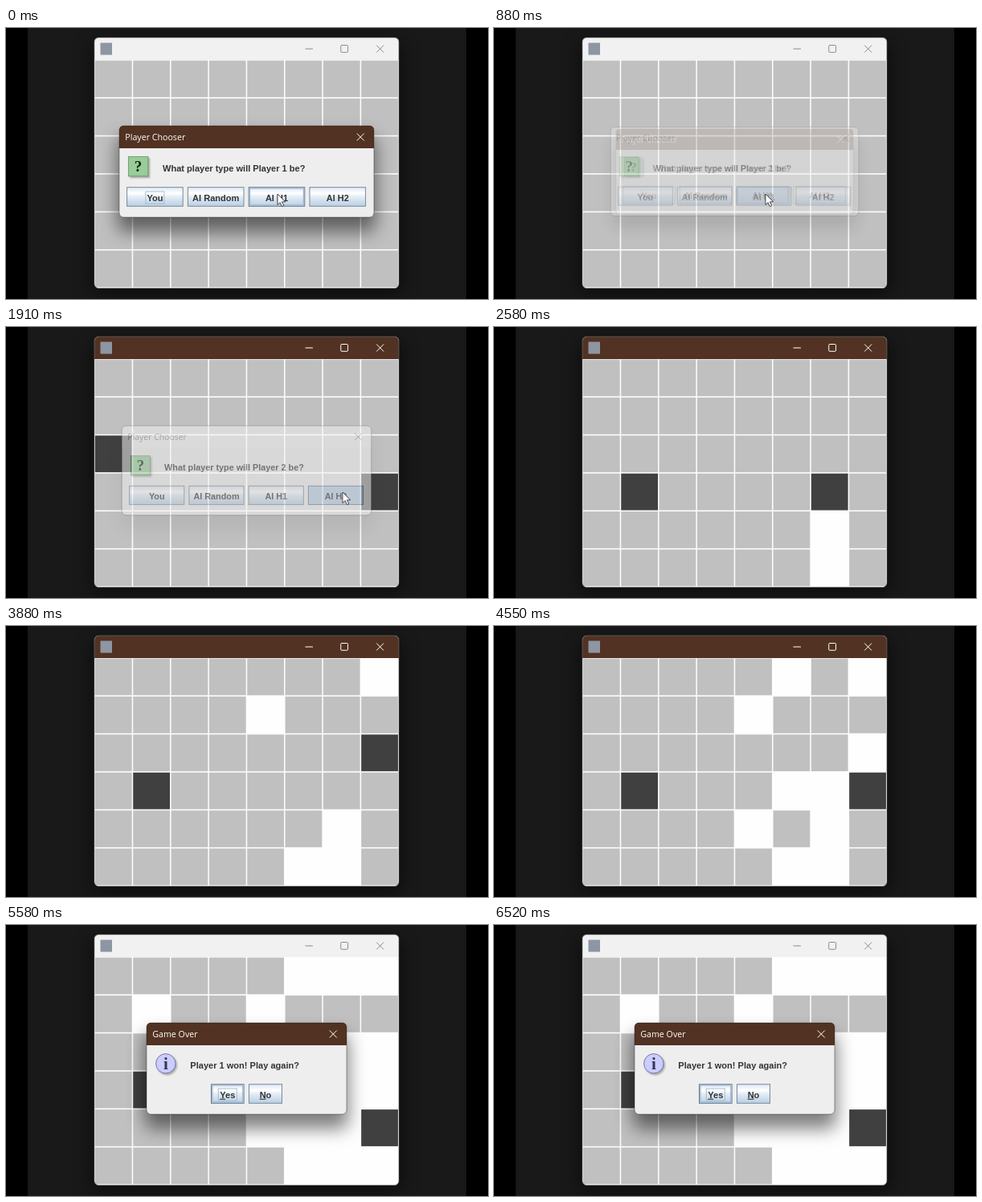
An HTML page for the animation above (6.58 s loop, 600 by 338 pixels).

```html
<!DOCTYPE html>
<html lang="en">
<head>
<meta charset="utf-8">
<title>Board game</title>
<style>
html, body { margin: 0; width: 100%; height: 100%; overflow: hidden; background: #000; }
svg { display: block; width: 100vw; height: 100vh; }
.title { font: 10.65px "Open Sans", "Noto Sans", sans-serif; }
.label { font: bold 11.05px "Liberation Sans", Arial, sans-serif; fill: #333; }
.mid { text-anchor: middle; }
</style>
</head>
<body>
<svg viewBox="0 0 600 338">
  <defs>
    <filter id="soft" x="-30%" y="-50%" width="160%" height="200%"><feGaussianBlur stdDeviation="11"/></filter>
    <filter id="near" x="-10%" y="-10%" width="120%" height="120%"><feGaussianBlur stdDeviation="1"/></filter>
    <linearGradient id="metal" x2="0" y2="1">
      <stop offset="0" stop-color="#dde8f3"/>
      <stop offset=".32" stop-color="#fff"/>
      <stop offset=".5" stop-color="#e4edf5"/>
      <stop offset="1" stop-color="#b8cfe5"/>
    </linearGradient>
    <clipPath id="screen"><rect x="27" width="546" height="338"/></clipPath>
    <clipPath id="frame"><rect x="110" y="12" width="379" height="312.5" rx="5.5"/></clipPath>
  </defs>
  <g id="scene" clip-path="url(#screen)"></g>
</svg>
<script>
const LOOP = 6580, BROWN = '#523222', PALE = '#f2f1f1';
const scene = document.getElementById('scene');

// time, player, column and row moved to, column and row removed
const moves = [
  [2420, 0, 1, 3, 6, 4], [2580, 1, 6, 3, 6, 5],
  [3150, 0, 2, 4, 5, 5], [3300, 1, 7, 2, 7, 0],
  [3880, 0, 1, 3, 4, 1], [4030, 1, 6, 1, 5, 0],
  [4330, 0, 2, 3, 6, 3], [4420, 1, 6, 2, 4, 4],
  [4490, 0, 1, 3, 7, 2], [4550, 1, 7, 3, 5, 3],
  [4640, 0, 2, 4, 6, 2], [4730, 1, 7, 4, 5, 2],
  [4840, 0, 1, 4, 7, 3], [4930, 1, 7, 5, 6, 0],
  [5050, 0, 2, 3, 5, 4], [5140, 1, 7, 4, 1, 1],
  [5300, 0, 1, 3, 7, 5]
];

const progress = (t, a, b) => Math.min(1, Math.max(0, (t - a) / (b - a)));
const easeOut = p => 1 - (1 - p) ** 3;
const smooth = p => p * p * (3 - 2 * p);
const within = (t, a, b) => t >= a && t < b;

const rect = (x, y, w, h, fill, more = '') =>
  `<rect x="${x}" y="${y}" width="${w}" height="${h}" fill="${fill}" ${more}/>`;
const text = (x, y, s, cls, more = '') => `<text x="${x}" y="${y}" class="${cls}" ${more}>${s}</text>`;
const line = (d, color, width = 1) => `<path d="${d}" fill="none" stroke="${color}" stroke-width="${width}"/>`;
const cross = (x, y, color) => line(`M${x - 4.5} ${y - 4.5}l9 9m0-9l-9 9`, color);

function board(t) {
  const players = t < 1850 ? [] : [[0, 2], [7, 3]];
  const gone = new Set();
  for (const [time, who, c, r, gc, gr] of moves) {
    if (t < time) break;
    players[who] = [c, r];
    gone.add(gc + 8 * gr);
  }
  let s = '';
  for (let i = 0; i < 48; i++) {
    const c = i % 8, r = i >> 3;
    if (gone.has(i)) continue;
    const taken = players.some(p => p[0] === c && p[1] === r);
    s += rect(110.9 + 47.33 * c, 40.6 + 47.38 * r, 45.8, 45.8, taken ? '#404040' : '#c0c0c0');
  }
  return s;
}

function mainWindow(t) {
  const active = within(t, 790, 880) || within(t, 1850, 5360);
  const ink = active ? '#fff' : '#8c8c8c';
  return rect(27, 0, 546, 338, '#191919') +
    rect(106, 18, 387, 314, '#000', 'rx="8" opacity=".5" filter="url(#soft)"') +
    `<g clip-path="url(#frame)">` +
    rect(110, 12, 379, 313, '#fefefe') +
    rect(110, 12, 379, 28, active ? BROWN : PALE) + board(t) + '</g>' +
    rect(110, 12, 379, 312.5, 'none', 'rx="5.5" stroke="#777" stroke-width=".6"') +
    rect(117.5, 18.5, 14.5, 15, '#8d96a2') +
    line('M372.5 26h9.5', ink) +
    rect(416.8, 21.5, 8.8, 8.8, 'none', `rx="1" stroke="${ink}"`) +
    cross(465.7, 26, ink);
}

// state: '', 'hover' or 'down'
function button(x, w, label, state, focusWidth) {
  const mid = x + w / 2;
  let s = rect(x, 198.7, w, 23.6, state === 'down' ? '#b8cfe5' : 'url(#metal)',
    `stroke="${state ? '#64788d' : '#7a8a99'}"`);
  if (state === 'hover') s += rect(x + 1.3, 200, w - 2.6, 21, 'none', 'stroke="#9fb9d3" stroke-width="1.4"');
  if (focusWidth) s += rect(mid - focusWidth / 2, 204, focusWidth, 15, 'none', 'stroke="#a3b8cc" stroke-width=".9"');
  return s + text(mid, 215.7, label, 'label mid');
}

function dialog(x, w, title, body, scale, alpha, closing) {
  const bar = closing ? PALE : BROWN, ink = closing ? '#888' : '#fff';
  return `<g opacity="${alpha}" transform="translate(299.5 179) scale(${scale}) translate(-299.5 -179)">` +
    rect(x - 2, 136, w + 4, 118, '#000', `rx="8" opacity="${closing ? 0.1 : 0.5}" filter="url(#soft)"`) +
    rect(x, 122, w, 114, '#eee', 'rx="5.5"') +
    `<path d="M${x} 150v-22.5q0-5.5 5.5-5.5h${w - 11}q5.5 0 5.5 5.5v22.5z" fill="${bar}"/>` +
    rect(x, 122, w, 114, 'none', 'rx="5.5" stroke="#000" stroke-opacity=".5" stroke-width=".7"') +
    text(x + 7.3, 140, title, 'title', `fill="${ink}"`) +
    cross(x + w - 16.7, 136, ink) + body + '</g>';
}

function chooser(n, states, scale, alpha, closing) {
  const names = ['You', 'AI Random', 'AI H1', 'AI H2'];
  const icon = rect(154, 162, 25, 25, '#777', 'opacity=".6" filter="url(#near)"') +
    rect(152.4, 160.4, 24.4, 24.4, '#99cc99', 'stroke="#669966" stroke-width=".9"') +
    text(164.6, 179, '?', 'mid', 'font-family="Liberation Serif, serif" font-weight="bold" font-size="19" fill="#0c260c"');
  const body = icon + text(195, 179, `What player type will Player ${n} be?`, 'label') +
    names.map((s, i) => button(150.6 + 75.8 * i, 69.6, s, states[i] || '', !i && !closing ? 23 : 0)).join('');
  return dialog(141, 317, 'Player Chooser', body, scale, alpha, closing);
}

function gameOver(scale, alpha) {
  const icon = '<circle cx="200.5" cy="174.7" r="12.5" fill="#777" opacity=".6" filter="url(#near)"/>' +
    '<circle cx="198.8" cy="172.8" r="12.2" fill="#ccccff" stroke="#7777aa"/>' +
    text(198.8, 179.5, 'i', 'mid', 'font-family="Liberation Serif, serif" font-weight="bold" font-size="21" fill="#333355"');
  const key = (a, rest) => `<tspan text-decoration="underline">${a}</tspan>${rest}`;
  return dialog(175, 249, 'Game Over', icon +
    text(229.3, 179, 'Player 1 won! Play again?', 'label') +
    button(255.5, 40.6, key('Y', 'es'), 'hover', 23) +
    button(302.5, 41, key('N', 'o'), ''), scale, alpha, false);
}

function pointer(t) {
  if (t >= 2300) return '';
  const over = smooth(progress(t, 1450, 1700)), away = progress(t, 2030, 2300);
  const x = 338 + 81 * over + 160 * away ** 1.5, y = 207 - over + 52 * away;
  return `<path transform="translate(${x} ${y})" d="M0 0V13.5L3.2 10.6L5.4 15.6L7.7 14.6L5.5 9.8H9.8Z" ` +
    'fill="#fff" stroke="#222" stroke-width=".8" stroke-linejoin="round"/>';
}

function popup(t) {
  if (t < 930) {
    const p = progress(t, 790, 930);
    const first = chooser(1, ['', '', t < 700 ? 'hover' : 'down'], 1 - 0.04 * p, 1 - p, p > 0);
    return first + (t < 880 ? '' : second(t));
  }
  if (t < 1970) return second(t);
  if (t < 5390) return '';
  const p = easeOut(progress(t, 5360, 5560));
  return gameOver(0.92 + 0.08 * p, p);
}

function second(t) {
  const opened = easeOut(progress(t, 870, 1080)), closed = progress(t, 1850, 1970);
  const hot = t < 1530 ? 2 : t < 1580 ? -1 : 3;
  const states = [0, 1, 2, 3].map(i => i !== hot ? '' : t < 1790 ? 'hover' : 'down');
  return chooser(2, states, 0.92 + 0.08 * opened - 0.04 * closed, opened * (1 - 0.9 * closed), closed > 0);
}

function draw(now) {
  const t = now % LOOP;
  scene.innerHTML = mainWindow(t) + popup(t) + pointer(t);
  requestAnimationFrame(draw);
}
draw(0);
</script>
</body>
</html>
```
